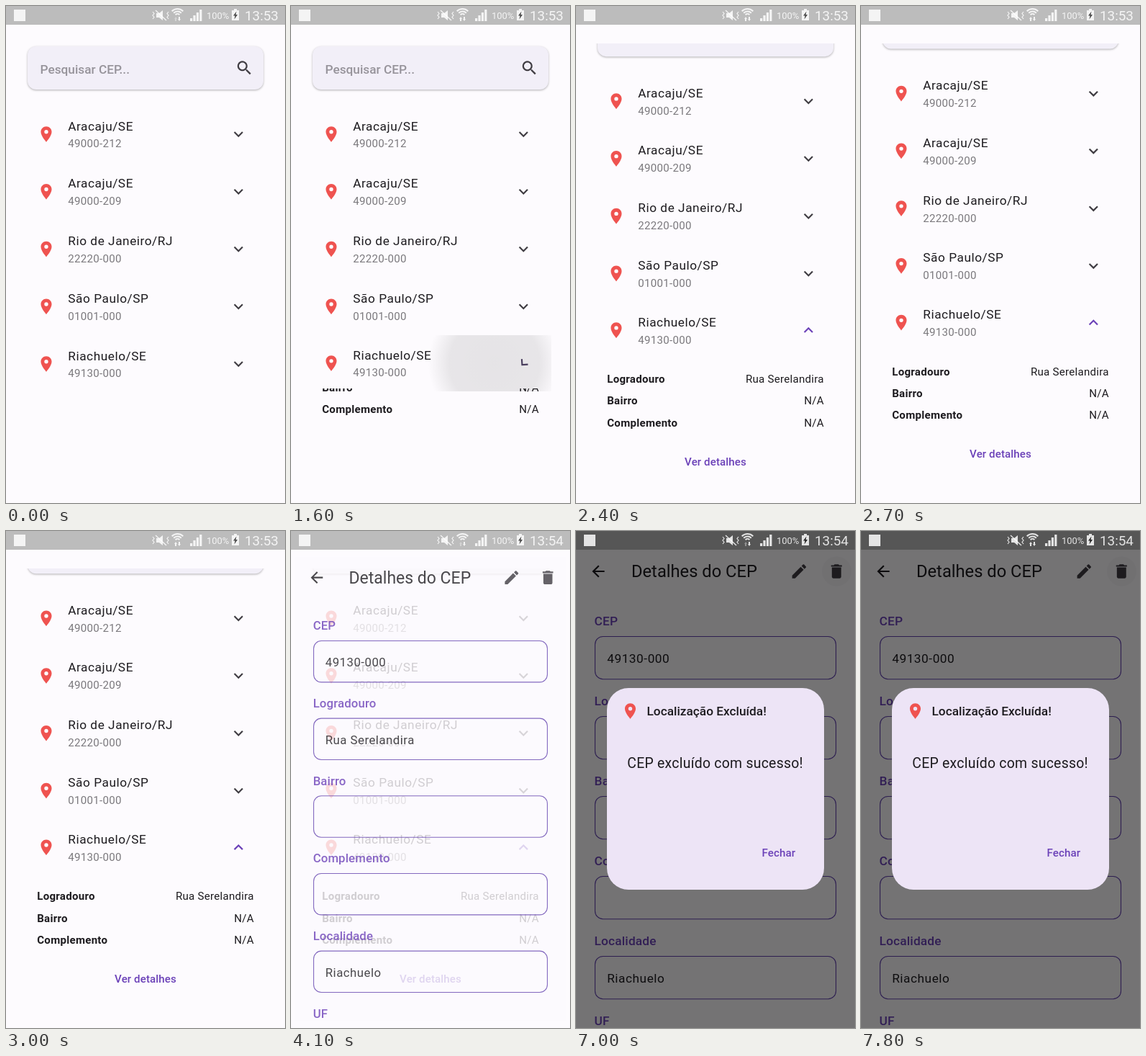
These frames come from a looping animation (388x690 px, 8 s). An HTML page with a canvas:

```html
<!DOCTYPE html>
<html lang="pt-BR">
<head>
<meta charset="utf-8">
<style>
  html, body { margin: 0; width: 100%; height: 100%; overflow: hidden; }
  canvas { display: block; }
</style>
</head>
<body>
<canvas id="stage" width="388" height="690"></canvas>
<script>
const ctx = document.getElementById('stage').getContext('2d');
const W = 388, H = 690, LOOP = 8000, DP = 388 / 360;
const BG = '#fdfbfe', INK = '#1d1b1f', GREY = '#7b797d', PURPLE = '#6b41b8', RED = '#ef5350', ICON = '#3f3c42';

const ICONS = {
  pin: 'M12 2C8.13 2 5 5.13 5 9c0 5.25 7 13 7 13s7-7.75 7-13c0-3.87-3.13-7-7-7zm0 9.5a2.5 2.5 0 0 1 0-5 2.5 2.5 0 0 1 0 5z',
  chevron: 'M16.59 8.59 12 13.17 7.41 8.59 6 10l6 6 6-6z',
  search: 'M15.5 14h-.79l-.28-.27A6.5 6.5 0 1 0 13.73 14.43l.27.28v.79l5 4.99L20.49 19zM9.5 14a4.5 4.5 0 1 1 0-9 4.5 4.5 0 0 1 0 9z',
  back: 'M20 11H7.83l5.59-5.59L12 4l-8 8 8 8 1.41-1.41L7.83 13H20z',
  edit: 'M3 17.25V21h3.75L17.81 9.94l-3.75-3.75zM20.71 7.04a1 1 0 0 0 0-1.41l-2.34-2.34a1 1 0 0 0-1.41 0l-1.83 1.83 3.75 3.75z',
  trash: 'M6 19c0 1.1.9 2 2 2h8c1.1 0 2-.9 2-2V7H6zM19 4h-3.5l-1-1h-5l-1 1H5v2h14z'
};
for (const name in ICONS) ICONS[name] = new Path2D(ICONS[name]);

const PLACES = [
  ['Aracaju/SE', '49000-212'],
  ['Aracaju/SE', '49000-209'],
  ['Rio de Janeiro/RJ', '22220-000'],
  ['São Paulo/SP', '01001-000'],
  ['Riachuelo/SE', '49130-000']
];
const STREET = 'Rua Serelandira';
const DETAILS = [['Logradouro', STREET], ['Bairro', 'N/A'], ['Complemento', 'N/A']];
const FIELDS = [['CEP', '49130-000'], ['Logradouro', STREET], ['Bairro', ''],
  ['Complemento', ''], ['Localidade', 'Riachuelo'], ['UF', '']];

const clamp = x => Math.min(1, Math.max(0, x));

// Font size and letter spacing are in dp.
function text(str, x, y, size, color = INK, { weight = 400, spacing = 0, align = 'left' } = {}) {
  ctx.font = `${weight} ${size * DP}px Roboto, sans-serif`;
  ctx.letterSpacing = spacing * DP + 'px';
  ctx.textAlign = align;
  ctx.fillStyle = color;
  ctx.fillText(str, x, y);
}

function icon(name, x, y, color = ICON, angle = 0) {
  ctx.save();
  ctx.translate(x, y);
  ctx.rotate(angle);
  ctx.scale(DP, DP);
  ctx.translate(-12, -12);
  ctx.fillStyle = color;
  ctx.fill(ICONS[name], 'evenodd');
  ctx.restore();
}

function rect(x, y, w, h, color) {
  ctx.fillStyle = color;
  ctx.fillRect(x, y, w, h);
}

function roundRect(x, y, w, h, r) {
  ctx.beginPath();
  ctx.roundRect(x, y, w, h, r);
}

function clipped(x, y, w, h, draw) {
  ctx.save();
  ctx.beginPath();
  ctx.rect(x, y, w, h);
  ctx.clip();
  draw();
  ctx.restore();
}

function line(points, width, color) {
  ctx.beginPath();
  for (let i = 0; i < points.length; i += 2) ctx.lineTo(points[i], points[i + 1]);
  ctx.lineWidth = width;
  ctx.strokeStyle = color;
  ctx.stroke();
}

function searchBar() {
  ctx.save();
  ctx.shadowColor = 'rgba(0,0,0,.3)';
  ctx.shadowBlur = 3;
  ctx.shadowOffsetY = 1;
  ctx.fillStyle = '#f2eff8';
  roundRect(30, 56, 328, 60, 12);
  ctx.fill();
  ctx.restore();
  text('Pesquisar CEP...', 47.5, 93.5, 16, '#96939a', { weight: 500 });
  icon('search', 331.5, 86);
}

function tileRipple(t) {
  if (t < 1500 || t >= 2100) return;
  const alpha = .095 * (1 - clamp((t - 1600) / 500));
  const glow = ctx.createRadialGradient(283, 496, 0, 283, 496, 40 + (t - 1450) * .35);
  glow.addColorStop(0, `rgba(0,0,0,${alpha})`);
  glow.addColorStop(.68, `rgba(0,0,0,${alpha * .9})`);
  glow.addColorStop(1, 'rgba(0,0,0,0)');
  rect(26, 457, 336, 78, glow);
}

function expandedDetails(open) {
  const height = 166;
  clipped(26, 531, 336, height * open, () => {
    ctx.translate(0, -(1 - open) * height / 2);
    DETAILS.forEach(([label, value], i) => {
      const y = 569.2 + i * 30.15;
      text(label, 43.2, y, 14, INK, { weight: 700, spacing: .25 });
      text(value, 344.8, y, 14, INK, { spacing: .25, align: 'right' });
    });
    text('Ver detalhes', 194, 683.7, 14, PURPLE, { weight: 500, spacing: .1, align: 'center' });
  });
}

function listPage(t) {
  const open = clamp((t - 1516) / 200) ** 1.7;
  const scroll = t < 2300 ? 0 : 56.8 * (1 - Math.exp((2250 - t) / 91));
  clipped(0, 52, W, 586, () => {
    ctx.translate(0, -scroll);
    searchBar();
    tileRipple(t);
    PLACES.forEach(([city, code], i) => {
      const last = i === 4;
      const y = 178 + i * 79.75 - (last ? Math.min(1, open * 4) : 0);
      icon('pin', 56, y, RED);
      text(city, 86.3, y - 5.5, 16, INK, { spacing: .5 });
      text(code, 86.3, y + 18.4, 14, GREY, { spacing: .25 });
      const tint = last ? open : 0;
      const color = `rgb(${63 + 44 * tint},${60 + 5 * tint},${66 + 118 * tint})`;
      icon('chevron', 323.3, y, color, tint * Math.PI);
    });
    if (open > 0) expandedDetails(open);
  });
}

function detailsPage(t) {
  rect(0, 26, W, H - 26, BG);
  if (t >= 5300) {
    ctx.fillStyle = t < 5400 ? 'rgba(60,50,70,.08)' : 'rgba(60,50,70,.03)';
    ctx.beginPath();
    ctx.arc(362.5, 56, 20.5, 0, 7);
    ctx.fill();
  }
  icon('back', 31, 56, INK);
  text('Detalhes do CEP', 77, 64.3, 22);
  icon('edit', 310.3, 56);
  icon('trash', 362.3, 56);
  FIELDS.forEach(([label, value], i) => {
    const y = i * 111;
    text(label, 25.6, y + 131, 16, PURPLE, { weight: 500, spacing: .15 });
    roundRect(26.5, y + 146.5, 335, 59.2, 11);
    ctx.lineWidth = 1.1;
    ctx.strokeStyle = '#6444b0';
    ctx.stroke();
    text(value, 43.2, y + 183, 16, INK, { spacing: .5 });
  });
}

function dialog() {
  ctx.fillStyle = '#ede4f6';
  roundRect(43, 218, 302, 280, 30);
  ctx.fill();
  icon('pin', 75.5, 250, RED);
  text('Localização Excluída!', 98.5, 256, 16, INK, { weight: 500 });
  text('CEP excluído com sucesso!', 71.3, 329, 18, INK, { spacing: .25 });
  text('Fechar', 258.5, 452.3, 14, PURPLE, { weight: 500, spacing: .1 });
}

function statusIcons(t) {
  const white = 'rgba(255,255,255,.84)', dim = 'rgba(255,255,255,.35)';
  rect(11, 5, 16, 16, white);

  // Muted speaker between vibration marks
  line([204, 8, 206, 10.5, 204, 13, 206, 15.5, 204, 18], 1.2, white);
  line([226, 8, 224, 10.5, 226, 13, 224, 15.5, 226, 18], 1.2, white);
  ctx.fillStyle = white;
  ctx.fill(new Path2D('M209 10h4l5-4v14l-5-4h-4z'));
  line([208, 6, 223, 20], 1.4, white);

  // Wi-Fi with activity arrows
  ctx.lineWidth = 2;
  ctx.strokeStyle = white;
  for (const r of [4, 7.5, 11]) {
    ctx.beginPath();
    ctx.arc(238.5, 15, r, -2.36, -.78);
    ctx.stroke();
  }
  const busy = (t >= 800 && t < 3800) || (t >= 4800 && t < 5800) || t >= 7800;
  ctx.fillStyle = busy ? white : dim;
  ctx.fill(new Path2D('M234 18l2-3 2 3h-1v3h-2v-3z'));
  ctx.fillStyle = white;
  ctx.fill(new Path2D('M239 18l2 3 2-3h-1v-3h-2v3z'));

  for (let i = 0; i < 4; i++) rect(256 + i * 4.4, 17 - i * 4, 3.2, 4 + i * 4, white);
  text('100%', 279, 18, 12, white);

  ctx.fillStyle = white;
  ctx.fill(new Path2D('M317 4h4v2h3v14h-10V6h3z'));
  ctx.fillStyle = t < 7000 ? '#4a4a4a' : '#222';
  ctx.fill(new Path2D('M320.5 7.5l-4.5 6h2.5l-1 5 4.5-6.5h-2.5z'));
  text(t < 3300 ? '13:53' : '13:54', 332, 20.3, 17.5, white);
}

function draw(t) {
  rect(0, 0, W, H, BG);
  if (t < 4200) listPage(t);
  if (t >= 4100) {
    ctx.save();
    if (t < 4200) {
      ctx.globalAlpha = .8;
      ctx.translate(W / 2, H / 2);
      ctx.scale(.97, .97);
      ctx.translate(-W / 2, -H / 2);
    }
    detailsPage(t);
    ctx.restore();
  }
  rect(0, 0, W, 26, '#bcbcbc');
  if (t >= 7000) {
    rect(0, 0, W, H, 'rgba(0,0,0,.54)');
    dialog();
  }
  statusIcons(t);
}

const start = performance.now();
function tick() {
  const t = (performance.now() - start) % LOOP;
  draw(Math.floor(t / 100) * 100);
  requestAnimationFrame(tick);
}
tick();
</script>
</body>
</html>
```
